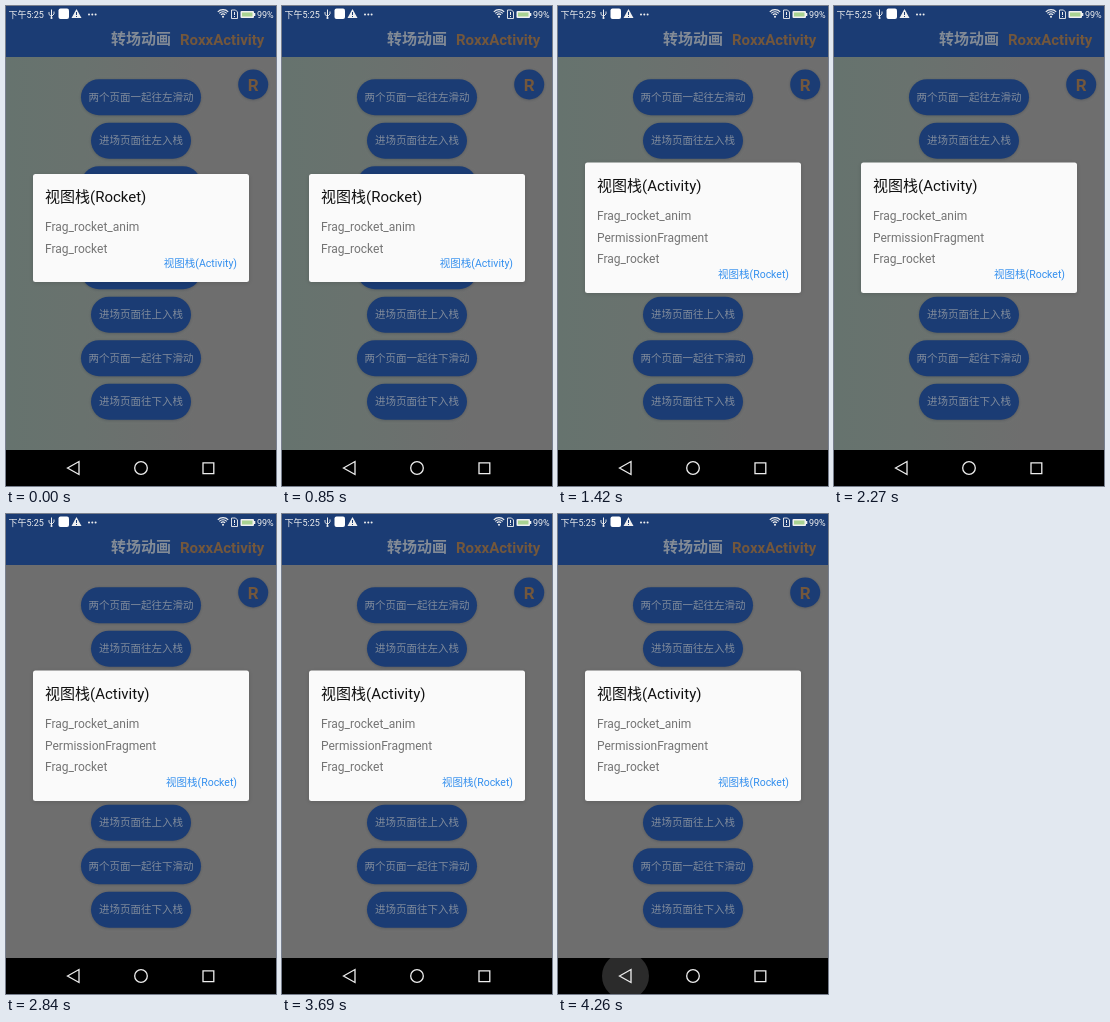
Animation of 270x480 px, one loop 5680 ms. Source, as an HTML page with a canvas:

```html
<!DOCTYPE html>
<html lang="zh-CN">
<head>
<meta charset="utf-8">
<title>转场动画</title>
<style>
html, body { margin: 0; width: 100%; height: 100%; overflow: hidden; background: #000; }
canvas { display: block; width: 100vw; height: 100vh; }
</style>
</head>
<body>
<canvas id="stage"></canvas>
<script>
const W = 270, H = 480, STEP = 1420;
const FONT = 'Roboto, "Noto Sans CJK SC", "Noto Sans CJK", sans-serif';
const BLUE = '#1b3c74', GREY = '#6e6e6e', ORANGE = '#73573c';
const canvas = document.getElementById('stage');
const ctx = canvas.getContext('2d');

const PAGE = ['两个页面一起往左滑动', '进场页面往左入栈', '两个页面一起往右滑动', '进场页面往右入栈',
  '两个页面一起往上滑动', '进场页面往上入栈', '两个页面一起往下滑动', '进场页面往下入栈'];
const ROCKET = { top: 168, bottom: 276, title: 'Rocket', action: 'Activity',
  items: ['Frag_rocket_anim', 'Frag_rocket'] };
const ACTIVITY = { top: 156.5, bottom: 287, title: 'Activity', action: 'Rocket',
  items: ['Frag_rocket_anim', 'PermissionFragment', 'Frag_rocket'] };
const SCENES = [
  { dialog: ROCKET, tint: true },
  { dialog: ACTIVITY, tint: true },
  { dialog: ACTIVITY },
  { dialog: ACTIVITY, pressed: true }
];

function rect(x, y, w, h, color) {
  ctx.fillStyle = color;
  ctx.fillRect(x, y, w, h);
}

function round(x, y, w, h, r, color) {
  ctx.beginPath();
  ctx.roundRect(x, y, w, h, r);
  ctx.fillStyle = color;
  ctx.fill();
}

function disc(x, y, r, color) {
  ctx.beginPath();
  ctx.arc(x, y, r, 0, Math.PI * 2);
  ctx.fillStyle = color;
  ctx.fill();
}

function line(points, color, width, closed) {
  ctx.beginPath();
  points.forEach(([x, y]) => ctx.lineTo(x, y));
  if (closed) ctx.closePath();
  ctx.strokeStyle = color;
  ctx.lineWidth = width;
  ctx.stroke();
}

// y is the visual middle of the line
function text(str, x, y, size, color, align = 'left', weight = 400) {
  ctx.font = `${weight} ${size}px ${FONT}`;
  ctx.textAlign = align;
  ctx.fillStyle = color;
  ctx.fillText(str, x, y + size * 0.36);
}

function shadowed(color, blur, dy, draw) {
  ctx.save();
  ctx.shadowColor = color;
  ctx.shadowBlur = blur * canvas.width / W;
  ctx.shadowOffsetY = dy * canvas.height / H;
  draw();
  ctx.restore();
}

function statusBar() {
  const ink = '#f0f0f0';
  text('下午5:25', 2.5, 8.5, 9, ink);

  line([[45.5, 3.5], [45.5, 12]], ink, 1);
  line([[43, 6], [43, 8.5], [45.5, 10.5], [48, 8], [48, 5.5]], ink, 0.9);
  disc(45.5, 12, 1.1, ink);
  round(52.5, 2.5, 10.5, 10.5, 2, '#fff');
  ctx.beginPath();
  ctx.moveTo(70.5, 3);
  ctx.lineTo(75.5, 12);
  ctx.lineTo(65.5, 12);
  ctx.fillStyle = ink;
  ctx.fill();
  rect(70, 6, 1, 3, BLUE);
  rect(70, 10, 1, 1, BLUE);
  for (let i = 0; i < 3; i++) disc(83 + i * 3.3, 8.5, 1, ink);

  ctx.strokeStyle = ink;
  ctx.lineWidth = 1.1;
  for (const r of [3, 5.2, 7.4]) {
    ctx.beginPath();
    ctx.arc(217, 11, r, -Math.PI * 0.75, -Math.PI * 0.25);
    ctx.stroke();
  }
  disc(217, 10.8, 1, ink);
  line([[225.5, 4], [229.5, 4], [231.5, 6], [231.5, 12.5], [225.5, 12.5]], ink, 0.9, true);
  rect(228, 6, 1, 3, ink);
  rect(228, 10, 1, 1, ink);
  round(234.5, 5, 13.5, 7, 1, ink);
  rect(236, 6.5, 10.5, 4, '#a9d292');
  rect(248, 7, 1.3, 3, ink);
  text('99%', 251, 8.7, 9, ink);
}

function page(scene) {
  rect(0, 51, W, 393, GREY);
  if (scene.tint) {
    const g = ctx.createLinearGradient(0, 0, 190, 0);
    g.addColorStop(0, '#66736e');
    g.addColorStop(0.4, '#69726e');
    g.addColorStop(1, GREY);
    rect(0, 51, 190, 393, g);
  }
  rect(0, 0, W, 51, BLUE);
  text('转场动画', 105, 33, 15, '#838b96', 'left', 700);
  text('RoxxActivity', 174, 33.5, 15, ORANGE, 'left', 700);

  const shade = 'rgba(45,52,65,.4)';
  PAGE.forEach((label, i) => {
    const y = 91.2 + i * 43.5, w = i % 2 ? 100 : 120;
    shadowed(shade, 3, 0.6, () => round(135 - w / 2, y - 18, w, 36, 18, BLUE));
    text(label, 135, y, 10.5, '#7f8a9b', 'center');
  });
  shadowed(shade, 3, 0.6, () => disc(247.2, 78.5, 15, BLUE));
  text('R', 247.2, 78.8, 17, ORANGE, 'center', 700);
}

function dialog({ top, bottom, title, action, items }) {
  shadowed('rgba(0,0,0,.14)', 4, 1, () => round(27, top, 216, bottom - top, 2.5, '#fafafa'));
  text(`视图栈(${title})`, 39, top + 22.7, 15, '#111');
  items.forEach((item, i) => text(item, 39, top + 53 + i * 21.75, 12, '#747474'));
  text(`视图栈(${action})`, 231, bottom - 18.7, 10.5, '#338fee', 'right');
}

function navBar(pressed) {
  rect(0, 444, W, 36, '#000');
  if (pressed) {
    ctx.save();
    ctx.beginPath();
    ctx.rect(0, 444, W, 36);
    ctx.clip();
    disc(67.5, 462, 23.5, '#2b2b2b');
    ctx.restore();
  }
  const ink = '#eee';
  line([[61.5, 462], [73, 455.5], [73, 468.5]], ink, 1.3, true);
  ctx.beginPath();
  ctx.arc(135, 462, 6.3, 0, Math.PI * 2);
  ctx.stroke();
  line([[197, 456.8], [207.8, 456.8], [207.8, 467.6], [197, 467.6]], ink, 1.3, true);
}

function resize() {
  const ratio = window.devicePixelRatio || 1;
  canvas.width = Math.round(innerWidth * ratio);
  canvas.height = Math.round(innerHeight * ratio);
}

const start = performance.now();

function frame() {
  const time = Math.max(0, performance.now() - start);
  const scene = SCENES[Math.floor(time / STEP) % SCENES.length];
  ctx.setTransform(canvas.width / W, 0, 0, canvas.height / H, 0, 0);
  page(scene);
  dialog(scene.dialog);
  statusBar();
  navBar(scene.pressed);
  requestAnimationFrame(frame);
}

addEventListener('resize', resize);
resize();
frame();
</script>
</body>
</html>
```
